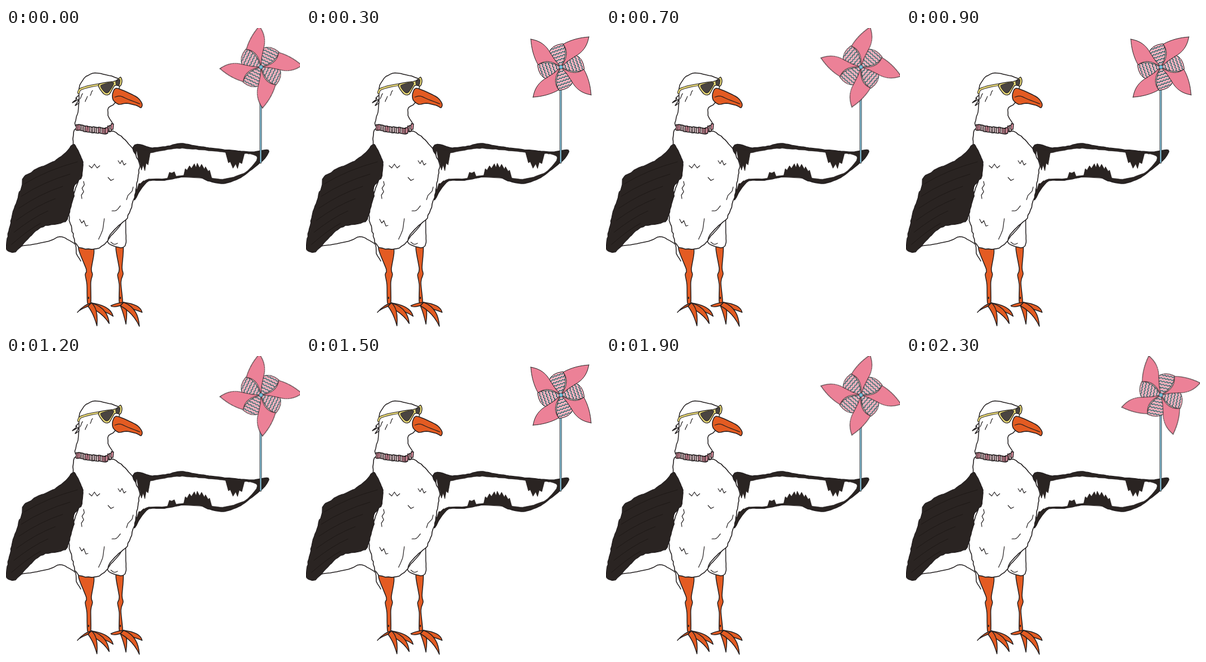
Animation of 527x538 px, one loop 2.4 s. Source, as an HTML page:

```html
<!DOCTYPE html>
<html lang="en">
<head>
<meta charset="utf-8">
<title>Gull with pinwheel</title>
<style>
  html, body { margin: 0; width: 100%; height: 100%; overflow: hidden; background: #fff; }
  svg { display: block; width: 527px; height: 538px; }
  path { stroke-linejoin: round; stroke-linecap: round; }
</style>
</head>
<body>
<svg viewBox="0 0 527 538">
  <defs>
    <path id="leaf" d="M0 0L25 -22Q40 -17 42 4Q24 14 0 0Z"/>
    <clipPath id="leafClip"><use href="#leaf"/></clipPath>
    <g id="vane">
      <use href="#leaf" fill="#fbdde1"/>
      <g clip-path="url(#leafClip)"><g id="print" transform="rotate(-19)"></g></g>
      <use href="#leaf" fill="none" stroke="#231f20"/>
      <path d="M50 -54C34 -53 18 -49 4 -41C14 -28 10 -14 0 0Q11 -11 25 -19C38 -26 47 -36 50 -54Z"
            fill="#ec8197" stroke="#231f20"/>
    </g>
  </defs>
  <g id="bird"></g>
  <path d="M456.5 72V241" stroke="#231f20" stroke-width="3.8"/>
  <path d="M456.5 72V241" stroke="#8fd3ee" stroke-width="2"/>
  <g transform="translate(457 70)">
    <g id="wheel">
      <use href="#vane"/>
      <use href="#vane" transform="rotate(90)"/>
      <use href="#vane" transform="rotate(180)"/>
      <use href="#vane" transform="rotate(270)"/>
      <circle r="3.6" fill="#74bfd8" stroke="#231f20" stroke-width=".7"/>
    </g>
  </g>
</svg>
<script>
const INK = '#231f20', DARK = '#2a2422', ORANGE = '#e35b22', YELLOW = '#eadb78', LENS = '#4a4441';
const bird = document.getElementById('bird');

let seed = 11;
const random = () => (seed = seed * 16807 % 2147483647) / 2147483647;
const jitter = amount => (random() - .5) * 2 * amount;
const mix = (a, b, t) => a + (b - a) * t;

function addPath(d, { fill = 'none', stroke = INK, width = 1.5, parent = bird } = {}) {
  const path = document.createElementNS('http://www.w3.org/2000/svg', 'path');
  for (const [key, value] of Object.entries({ d, fill, stroke, 'stroke-width': width }))
    path.setAttribute(key, value);
  parent.append(path);
}

// A smooth curve through a few key points, sampled with a hand-drawn wobble.
function sketch(keys, closed, rough) {
  const pts = keys.split(' ').map(p => p.split(',').map(Number)), n = pts.length;
  const at = i => closed ? pts[(i + n) % n] : pts[Math.max(0, Math.min(n - 1, i))];
  const out = [];
  for (let i = 0; i < (closed ? n : n - 1); i++) {
    const [a, b, c, e] = [at(i - 1), at(i), at(i + 1), at(i + 2)];
    const steps = Math.max(3, Math.round(Math.hypot(c[0] - b[0], c[1] - b[1]) / 5));
    for (let s = 0; s < steps; s++) {
      const t = s / steps;
      out.push([0, 1].map(k => {
        const m = (c[k] - a[k]) * .42, w = (e[k] - b[k]) * .42, d = c[k] - b[k];
        const v = b[k] + t * (m + t * (3 * d - 2 * m - w + t * (m + w - 2 * d)));
        return (v + jitter(rough)).toFixed(1);
      }));
    }
  }
  if (!closed) out.push(at(n - 1));
  return 'M' + out.join('L') + (closed ? 'Z' : '');
}
const shape = (keys, fill, rough = 0, style) => addPath(sketch(keys, true, rough), { fill, ...style });
const line = (keys, rough = 0, style) => addPath(sketch(keys, false, rough), style);

// Dark feathers hanging from a base line, longest in the middle.
function fringe(x1, y1, x2, y2, depth, spikes) {
  let d = `M${x1} ${y1}`;
  for (let i = 1; i < spikes * 2; i++) {
    const t = i / (spikes * 2);
    const reach = depth * (.45 + .55 * Math.sin(Math.PI * t)) * (i % 2 ? 1 : .7);
    d += `L${mix(x1, x2, t) + jitter(1.5)} ${mix(y1, y2, t) + reach}`;
  }
  addPath(d + `L${x2} ${y2}Z`, { fill: DARK, stroke: DARK, width: .8 });
}

// A few pen zigzags between two points.
function scribble(x1, y1, x2, y2, turns) {
  let d = `M${x1} ${y1}`;
  for (let i = 1; i <= turns; i++) {
    const t = i / turns, side = i < turns ? (i % 2 ? 4 : -3) : 0, steep = Math.abs(y2 - y1) > 20;
    d += `L${mix(x1, x2, t) + (steep ? side / 2 : 0)} ${mix(y1, y2, t) + (steep ? 0 : side)}`;
  }
  addPath(d, { width: 1.2 });
}

// A tapering toe that arches from the ankle down to a claw.
function toe(x, y, tipX, tipY, thick) {
  const bendX = mix(x, tipX, .75), bendY = mix(y, tipY, .25);
  addPath(`M${x - thick / 2} ${y + thick / 2}Q${bendX - thick / 2} ${bendY + thick} ${tipX} ${tipY}` +
    `Q${bendX + thick} ${bendY - thick / 2} ${x + thick / 2} ${y - thick / 2}Z`, { fill: ORANGE });
}

// Outstretched wing
shape('228,214 262,215 290,212 313,207 350,213 400,219 440,222 470,219 466,231 455,242 421,268 390,279 362,274 346,267 318,267 284,273 256,274 241,290 228,306',
  DARK, .3);
shape('234,222 257,224 312,216 395,223 438,226 450,231 446,242 430,258 412,266 388,271 362,268 340,264 318,264 284,270 256,271 242,278 232,290',
  '#fff', .4, { width: .6 });
fringe(234, 217, 259, 221, 38, 4);
fringe(393, 221, 428, 223, 31, 4);
fringe(369, 270, 318, 267, -26, 7);
fringe(306, 269, 289, 271, -14, 2);
fringe(229, 304, 249, 278, -12, 3);

// Tail and legs
line('28,391 55,387 80,381 96,374 110,379 125,389 126,404 134,418', .4);
shape('130,393 157,395 153,432 155,442 152,456 152,493 146,493 145,460 142,442 144,433', ORANGE);
shape('197,393 210,392 208,430 210,441 206,456 209,492 203,492 203,460 200,443 203,432', ORANGE);
for (const [tipX, tipY] of [[128, 510], [192, 517], [185, 530], [163, 534]]) toe(150, 496, tipX, tipY, 6);
for (const [tipX, tipY] of [[188, 498], [244, 510], [215, 531], [239, 535]]) toe(208, 495, tipX, tipY, 6);
line('148,483 148,485', 0, { width: 2.2 });
line('205,483 205,485', 0, { width: 2.2 });

// Far thigh and body
shape('229,300 215,340 215,385 206,394 182,383 207,350', '#fff', .3);
line('188,384 194,388 200,386', 0, { width: 1.2 });
shape('127,180 121,209 137,240 128,278 121,300 113,335 119,365 128,391 157,397 177,388 192,364 217,340 231,300 238,260 238,240 220,208 188,184',
  '#fff', 1, { width: 1.6 });
line('176,342 173,362 166,379', .4, { width: 1.2 });

// Folded wing with faint feather lines
shape('122,208 137,240 136,265 122,285 122,302 115,325 106,347 67,356 46,371 17,401 1,398 2,378 8,350 16,319 27,287 32,268 55,253 87,238 110,221',
  DARK, .9, { width: 1.2 });
for (let i = 0; i < 6; i++) {
  const t = i / 5, x = mix(32, 10, t), y = mix(280, 388, t);
  addPath(`M${x} ${y}Q${mix(75, 40, t)} ${y - 26} ${mix(128, 62, t)} ${mix(240, 350, t)}`,
    { stroke: '#1b1614', width: .8 });
}

// Head, neck and nape tuft
shape('127,178 129,150 131,128 131,110 134,99 143,87 160,81 184,85 203,92 203,108 195,135 184,143 183,157 190,178',
  '#fff', .5);
line('130,121 125,126 127,127 119,134 131,128 124,139 130,135');
for (const [x, y] of [[155, 112], [146, 123], [137, 118]])
  line(`${x},${y} ${x - 4},${y + 9}`, .4, { width: 1.2 });

// Beak
shape('197,108 217,115 236,125 244,136 242,143 234,139 216,135 202,137 192,129 191,118', ORANGE);
line('195,124 205,122 219,128 240,136', 0, { width: 1.2 });

// Sunglasses
const arm = '130,116 133,110 148,105 170,101';
line(arm, 0, { width: 4.4 });
line(arm, 0, { width: 2.4, stroke: YELLOW });
shape('166,101 196,95 205,88 208,95 205,104 195,103 185,119 175,118', YELLOW, 0, { width: 1.3 });
shape('170,103 193,98 184,115 177,115', LENS, 0, { width: 1 });
shape('197,96 204,92 203,102 198,102', LENS, 0, { width: 1 });

// Frilled collar
const collarTop = x => x < 174 ? 173 + (x - 126) * .145 : 180 - (x - 174) * .5;
for (let x = 126; x < 192; x += 3.3) {
  const top = collarTop(x) + jitter(1), fill = random() < .55 ? '#ec9aab' : '#f7dce0';
  addPath(`M${x} ${top}l4 .4l${jitter(1)} 10l-4 -.4Z`, { fill, width: 1.5 });
}

// Plumage marks
scribble(149, 247, 168, 247, 4);
scribble(139, 275, 136, 306, 5);
scribble(201, 238, 215, 243, 4);
scribble(183, 268, 193, 271, 2);
scribble(228, 285, 216, 308, 3);
scribble(132, 343, 147, 354, 4);
line('190,328 198,327 205,319', .3, { width: 1.2 });

// Zigzag print: teal and pink rows across the folded side of a vane
const print = document.getElementById('print');
for (let row = 0; row < 16; row++) {
  let d = '';
  for (let i = 0; i <= 26; i++)
    d += `${i ? 'L' : 'M'}${2 + row * 2.8 + (i % 2 ? 1 : -1)} ${-36 + i * 2.8}`;
  addPath(d, { parent: print, stroke: row % 2 ? '#f19bad' : '#234c55', width: row % 2 ? 1.5 : 1.4 });
}

// Twenty-four clicks of 15 degrees per turn
document.getElementById('wheel').animate(
  [{ transform: 'rotate(45deg)' }, { transform: 'rotate(405deg)' }],
  { duration: 2400, iterations: Infinity, easing: 'steps(24, end)' });
</script>
</body>
</html>
```
